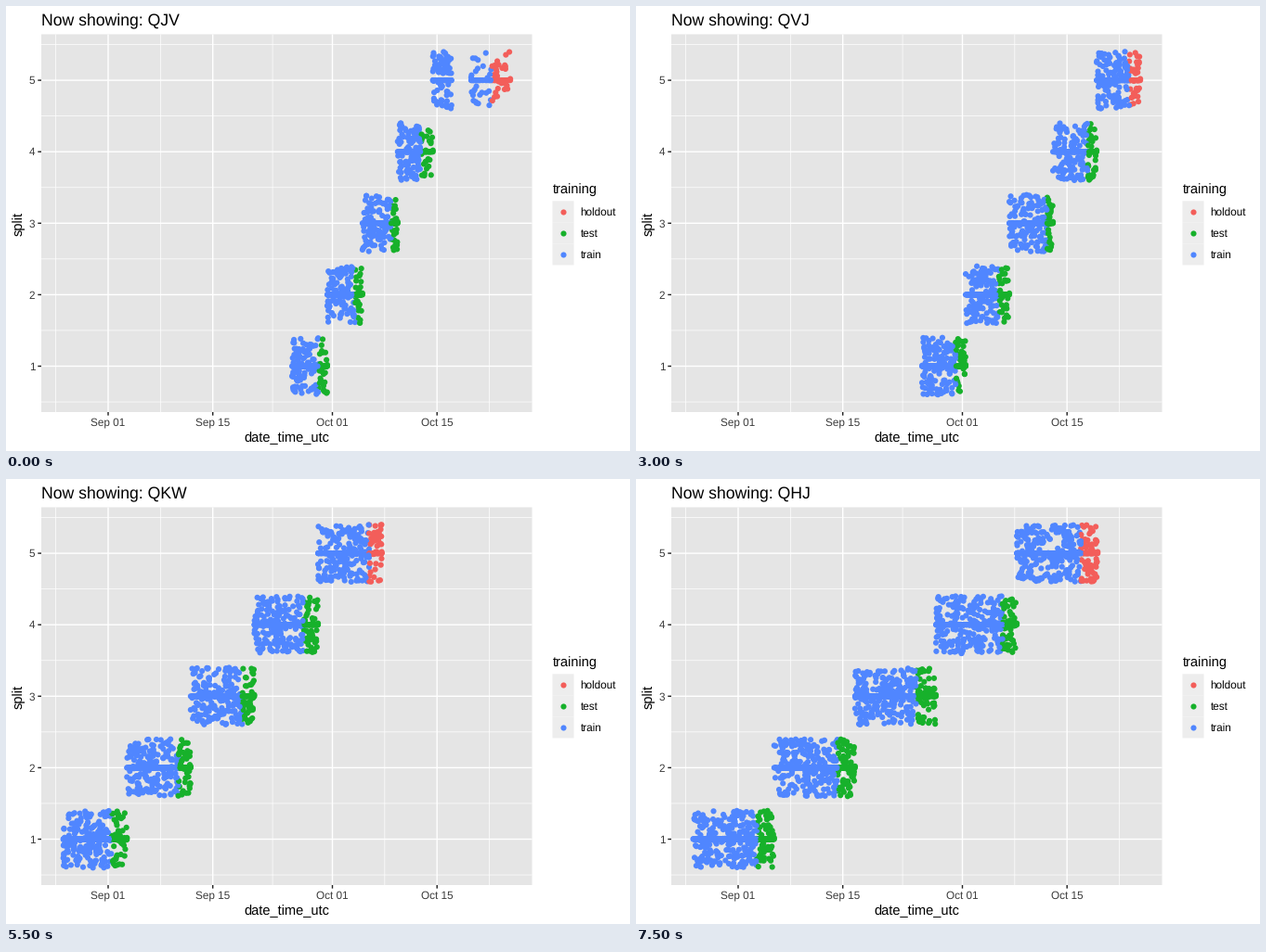
Animation, 672 px wide and 480 px high, one loop 8 s. Source, as a matplotlib script:

```python
import numpy as np
import matplotlib.pyplot as plt
from matplotlib.animation import FuncAnimation
from matplotlib.patches import Rectangle

W, H, DPI = 672, 480, 96
STEPS, STEP_MS = 16, 500
LEFT, RIGHT, TOP, BOTTOM = 38, 566.5, 30.5, 438
DAY, ROW = 8.05, 77.1
HOLDOUT, TEST, TRAIN = "#F35E5A", "#17B12B", "#5086FF"
DOT = (6.16 * 72 / DPI) ** 2
SPLITS, TRAIN_SHARE, PER_DAY = 5, 0.79, 26.5

TITLES = ["QJV", "QXWU", "QJZ", "QVJ", "QZKW", "QKW", "QWW", "QHJ"]


def span(start, end, rate=1):
    """Days since Sep 01 with observations, at a relative rate."""
    return start, end, rate


EARLY, LATE = span(-6, 8.45), span(24.6, 53.8)
SERIES = [
    [span(24.6, 46), span(48.4, 53.8, 0.4)],
    [EARLY, LATE],
    [EARLY, span(24.6, 26.4), span(28.4, 29.2), span(30.6, 34.5),
     span(39.9, 53.8)],
    [LATE],
    [span(-3.5, 14.7), span(15.5, 24.6)],
    [span(8.45, 24.6), span(36.5, 43.6), span(53, 53.03)],
    [span(-6, 36.6)],
    [span(-6, -5.5), span(-5, -3.7), span(-2.9, -2.8), span(-1.6, -1.4),
     span(-0.2, 8.45), span(24.6, 25.1), span(27.6, 27.7),
     span(30.3, 30.7), span(35.5, 36.5)],
    [span(-6, 48.1)],
]


def day_x(day):
    return 110 + DAY * day


def row_y(k):
    return 388.5 - (k - 1) * ROW


def build(seed, spans):
    """Cut the observations into equal splits, each ending in a test part."""
    rng = np.random.default_rng(seed)
    amounts = [(b - a) * rate for a, b, rate in spans]
    days = np.array([s[:2] for s in spans]).ravel()
    ends = np.cumsum(amounts)
    done = np.column_stack([ends - amounts, ends]).ravel()
    n = int(ends[-1] * PER_DAY / SPLITS)
    pts, cols = [], []
    for k in range(1, SPLITS + 1):
        u = np.sort(rng.random(n))
        u[0], u[-1] = 0, 1
        x = day_x(np.interp((k - 1 + u) / SPLITS * ends[-1], done, days))
        jitter = rng.uniform(-0.4, 0.4, n)
        jitter[-1] = 0.02
        tail = HOLDOUT if k == SPLITS else TEST
        col = np.where(np.arange(n) < TRAIN_SHARE * n, TRAIN, tail)
        for y in (row_y(k + jitter), np.full(n, row_y(k))):
            pts.append(np.column_stack([x, y]))
            cols.append(col)
    return np.vstack(pts), np.concatenate(cols)


clouds = [build(11 + i, spans) for i, spans in enumerate(SERIES)]

plt.rcParams["font.family"] = "Liberation Sans"
plt.rcParams["text.hinting"] = "none"
fig = plt.figure(figsize=(W / DPI, H / DPI), dpi=DPI, facecolor="white")
ax = fig.add_axes([0, 0, 1, 1])
ax.set_xlim(0, W)
ax.set_ylim(H, 0)
ax.axis("off")


def line(xs, ys, px, z, color="white"):
    ax.plot(xs, ys, color=color, lw=px * 72 / DPI, zorder=z,
            solid_capstyle="butt", snap=False)


def rect(x, y, w, h, color):
    ax.add_patch(Rectangle((x, y), w, h, fc=color, lw=0, zorder=0,
                           snap=False))


def label(x, y, s, pt, color="black", **kw):
    return ax.text(x, y, s, fontsize=pt, color=color, va="baseline", **kw)


rect(LEFT, TOP, RIGHT - LEFT, BOTTOM - TOP, "#E5E5E5")

for day in (-7, 7, 22, 37, 51):
    line([day_x(day)] * 2, [TOP, BOTTOM], 0.71, 1)
for k in range(SPLITS + 1):
    line([LEFT, RIGHT], [row_y(k + 0.5)] * 2, 0.71, 1)

for day, name in ((0, "Sep 01"), (14, "Sep 15"), (30, "Oct 01"), (44, "Oct 15")):
    x = day_x(day)
    line([x, x], [TOP, BOTTOM], 1.42, 2)
    line([x, x], [BOTTOM, BOTTOM + 3.67], 1.42, 2, "#222222")
    label(x, 453, name, 8.8, "#3C3C3C", ha="center")
for k in range(1, SPLITS + 1):
    y = row_y(k)
    line([LEFT, RIGHT], [y, y], 1.42, 2)
    line([LEFT - 3.67, LEFT], [y, y], 1.42, 2, "#222222")
    label(31.4, y + 4.2, str(k), 8.8, "#3C3C3C", ha="right")

label(302.2, 470, "date_time_utc", 11, ha="center")
label(17.5, 234.5, "split", 11, ha="center", rotation=90,
      rotation_mode="anchor")

KEY = 23.04
label(588.5, 202, "training", 11)
for i, (name, color) in enumerate(
        (("holdout", HOLDOUT), ("test", TEST), ("train", TRAIN))):
    y = 210.3 + KEY * i
    rect(588.5, y, KEY, KEY, "#EDEDED")
    ax.scatter([588.5 + KEY / 2], [y + KEY / 2], s=DOT, c=color, lw=0,
               zorder=3, snap=False)
    label(618.5, y + KEY / 2 + 4.3, name, 8.8)

title = label(37.8, 20, "", 13.2)
dots = ax.scatter([], [], s=DOT, lw=0, zorder=4, snap=False)


def draw(step):
    # the points run half a beat ahead of the title
    title.set_text("Now showing: " + TITLES[step // 2])
    pts, cols = clouds[(step + 1) // 2]
    order = np.random.default_rng(100 + step).permutation(len(pts))
    dots.set_offsets(pts[order])
    dots.set_facecolor(cols[order])
    return title, dots


anim = FuncAnimation(fig, draw, frames=STEPS, interval=STEP_MS,
                     init_func=lambda: draw(0), repeat=True, repeat_delay=0)
plt.show()
```
